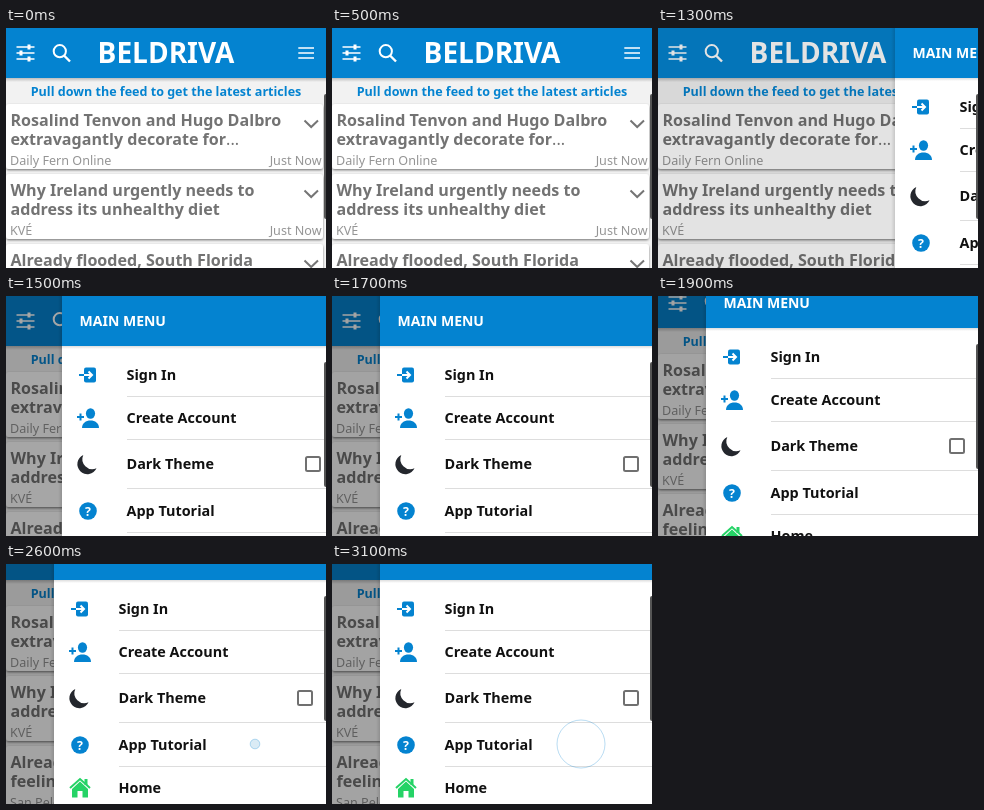
Animation of 320x240 px, one loop 3.2 s. Source, as an HTML page:

```html
<!DOCTYPE html>
<html lang="en">
<head>
<meta charset="utf-8">
<title>News feed with side menu</title>
<style>
  html, body { margin: 0; width: 100%; height: 100%; overflow: hidden; background: #f2f2f2; }
  svg { display: block; width: 100%; height: 100%; font-family: "Noto Sans", sans-serif; }
  .bold { font-weight: 700; }
  .headline { font: 700 16.1px "Noto Sans", sans-serif; fill: #737373; }
  .meta { font-size: 12.6px; fill: #959595; }
  .label { font: 700 14.4px "Noto Sans", sans-serif; fill: #111; }
  .line { fill: none; stroke-width: 2; }
  .blue { fill: #0483d0; }
</style>
</head>
<body>
<svg viewBox="0 0 320 240">
  <defs>
    <linearGradient id="fadeDown" x2="0" y2="1">
      <stop offset="0" stop-opacity=".22"/><stop offset="1" stop-opacity="0"/>
    </linearGradient>
    <linearGradient id="fadeLeft">
      <stop offset="0" stop-opacity="0"/><stop offset="1" stop-opacity=".12"/>
    </linearGradient>
    <filter id="cardShadow" x="-5%" y="-10%" width="110%" height="125%">
      <feDropShadow dx="0" dy="1.2" stdDeviation="1.1" flood-opacity=".5"/>
    </filter>
  </defs>

  <g id="page">
    <rect width="320" height="290" fill="#f2f2f2"/>
    <text class="bold blue" x="160" y="67.5" font-size="12.55" text-anchor="middle">Pull down the feed to get the latest articles</text>
    <g id="feed"></g>

    <rect y="50" width="320" height="4" fill="url(#fadeDown)"/>
    <rect class="blue" width="320" height="50"/>
    <text class="bold" x="160" y="35" font-size="28" text-anchor="middle" fill="#fff">BELDRIVA</text>
    <g class="line" stroke="#fff">
      <path d="M10.5 19H28.5M10.5 25H28.5M10.5 31H28.5" stroke-width="1.5"/>
      <path d="M23 16.5v5M15 22.5v5M23 28.5v5" stroke-width="3"/>
      <circle cx="53.8" cy="23.2" r="6.1"/>
      <path d="M58 27.5L64 33.5" stroke-width="2.4"/>
      <path d="M292.3 20H308M292.3 25H308M292.3 30H308" stroke-width="1.6"/>
    </g>

    <rect id="dim" width="320" height="290" opacity="0"/>

    <g id="menu">
      <rect x="-4" width="4" height="290" fill="url(#fadeLeft)"/>
      <rect width="272" height="290" fill="#fff"/>
      <rect y="50" width="272" height="3" fill="url(#fadeDown)" opacity=".6"/>
      <rect class="blue" width="272" height="50"/>
      <text class="bold" x="17.6" y="30" font-size="14" fill="#fff">MAIN MENU</text>
      <g id="items"></g>

      <g class="line" transform="translate(26 79)">
        <rect class="blue" x="-4" y="-7.5" width="12" height="15" rx="2"/>
        <path d="M-4.5 0H4M.5-3.5L4 0L.5 3.5" stroke="#fff"/>
        <path d="M-9 0H-4" stroke="#0483d0"/>
      </g>
      <g class="blue" transform="translate(26 122)">
        <ellipse cx="2.5" cy="-4.5" rx="4.6" ry="5.2"/>
        <path d="M-6 10C-6 5-2 2.5 2.5 2.5S11 5 11 10Z"/>
        <path class="line" stroke="#0483d0" d="M-11-1H-4M-7.5-4.5V2.5"/>
      </g>
      <path transform="translate(25.5 168)" fill="#24272d" d="M-4.2-9A10 10 0 1 0 9 4.2A10 10 0 0 1-4.2-9Z"/>
      <g transform="translate(26 215)">
        <circle class="blue" r="8.8"/>
        <text class="bold" y="4.5" text-anchor="middle" font-size="12.5" fill="#fff">?</text>
      </g>
      <g transform="translate(26 258)" fill="#25d366">
        <path d="M0-6.5L8 1V9.5H2.5V3H-2.5V9.5H-8V1ZM4.5-9H7.5V-3H4.5Z"/>
        <path class="line" stroke="#25d366" d="M-10 0L0-9L10 0"/>
      </g>
      <rect class="line" x="244" y="161" width="14" height="14" rx="1.5" stroke="#707070"/>
    </g>

    <rect x="318" y="66" width="5" height="125" rx="2" fill="#555"/>
  </g>
  <circle id="touch" fill="#c8e1f0" stroke="#0483d0" stroke-opacity=".28"/>
</svg>
<script>
const LOOP = 3200, STEP = 100;
const MENU_WIDTH = 272, SCROLL = 34;
const get = id => document.getElementById(id);

const articles = [
  ["Rosalind Tenvon and Hugo Dalbro", 'extravagantly decorate for<tspan font-weight="400">...</tspan>', "Daily Fern Online"],
  ["Why Ireland urgently needs to", "address its unhealthy diet", "KVÉ"],
  ["Already flooded, South Florida", "feeling effects of rising seas", "San Pelo Courier"]
];
get("feed").innerHTML = articles.map(([first, second, outlet], i) => `
  <g transform="translate(0 ${76 + 70 * i})">
    <rect width="317" height="65" rx="3" fill="#fff" filter="url(#cardShadow)"/>
    <text class="headline" x="4.5" y="22">${first}</text>
    <text class="headline" x="4.5" y="41.3">${second}</text>
    <text class="meta" x="4" y="60.5">${outlet}</text>
    <text class="meta" x="315.6" y="60.5" text-anchor="end">Just Now</text>
    <path class="line" stroke="#757575" d="M298.5 16.5L305.2 23L312 16.5"/>
  </g>`).join("");

const items = [["Sign In", 84, 100], ["Create Account", 127, 143], ["Dark Theme", 173, 192],
  ["App Tutorial", 220, 236], ["Home", 263, 279]];
get("items").innerHTML = items.map(([name, baseline, divider]) => `
  <text class="label" x="64.5" y="${baseline}">${name}</text>
  <rect x="65" y="${divider}" width="207" height="1" fill="#ddd"/>`).join("");

const taps = [{ start: 700, end: 1300, x: 300, y: 25 }, { start: 2500, end: LOOP, x: 249, y: 180 }];

// Exponential approach from 0 to 1.
const settle = (time, start, decay) => time < start ? 0 : 1 - Math.exp((start - time) / decay);

function drawTouch(time) {
  const touch = get("touch");
  const tap = taps.find(({ start, end }) => time >= start && time < end);
  touch.style.display = tap ? "" : "none";
  if (!tap) return;
  const age = (time - tap.start) / 600;
  touch.setAttribute("cx", tap.x);
  touch.setAttribute("cy", tap.y);
  touch.setAttribute("r", 1 + 23 * age);
  touch.setAttribute("fill-opacity", 0.8 * (1 - age));
}

function draw(now) {
  const time = Math.floor(now % LOOP / STEP) * STEP;
  const open = settle(time, 1276.8, 63.7);
  const scroll = Math.round(SCROLL * settle(time, 1818, 108));
  get("page").setAttribute("transform", `translate(0 ${-scroll})`);
  get("menu").setAttribute("transform", `translate(${Math.round(320 - MENU_WIDTH * open)} 0)`);
  get("menu").style.display = open ? "" : "none";
  get("dim").setAttribute("opacity", 0.36 * open);
  drawTouch(time);
}

function tick() {
  draw(performance.now());
  requestAnimationFrame(tick);
}
tick();
</script>
</body>
</html>
```
